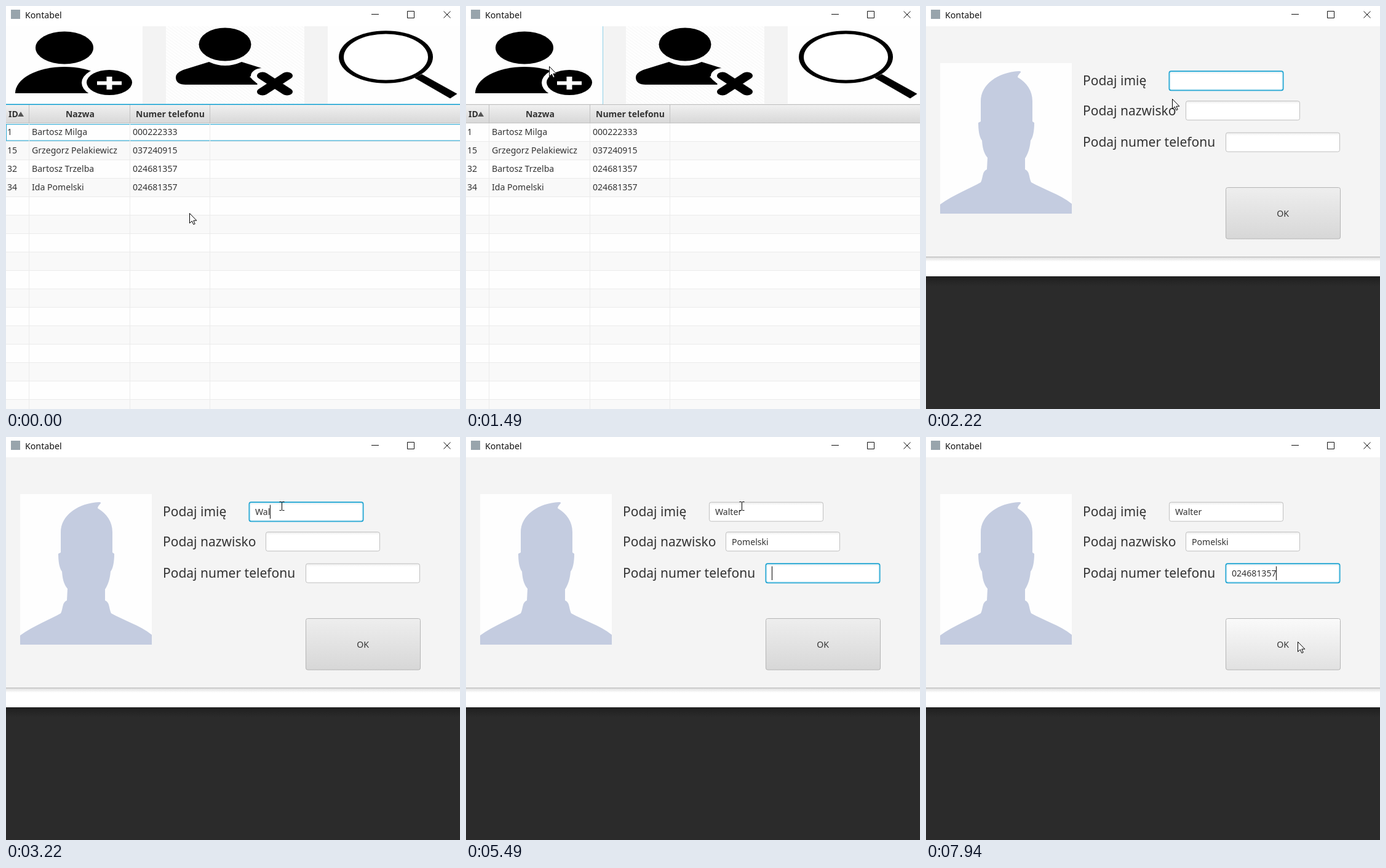
An HTML page that plays this animation: 738x656 px, repeating every 8 s.

```html
<!DOCTYPE html>
<html lang="pl">
<head>
<meta charset="utf-8">
<title>Kontabel</title>
<style>
  html, body { margin: 0; width: 100%; height: 100%; overflow: hidden; background: #fff; }
  svg { display: block; width: 100vw; height: 100vh; }
  text { font: 14.1px "Noto Sans", "Open Sans", sans-serif; fill: #333; white-space: pre; }
  .head { font-weight: 700; font-size: 14px; }
  .label { font-size: 21px; }
  .title { font-size: 14.2px; fill: #111; }
  .mid { text-anchor: middle; }
</style>
</head>
<body>
<svg id="stage" viewBox="0 0 738 656" xmlns="http://www.w3.org/2000/svg">
  <defs>
    <linearGradient id="headFill" x2="0" y2="1"><stop stop-color="#f0f0f0"/><stop offset="1" stop-color="#d8d8d8"/></linearGradient>
    <linearGradient id="buttonFill" x2="0" y2="1"><stop stop-color="#eee"/><stop offset="1" stop-color="#d7d7d7"/></linearGradient>
    <linearGradient id="hoverFill" x2="0" y2="1"><stop stop-color="#fafafa"/><stop offset="1" stop-color="#e1e1e1"/></linearGradient>
    <linearGradient id="fieldFill" x2="0" y2="1"><stop stop-color="#ececec"/><stop offset=".16" stop-color="#fff"/></linearGradient>
    <linearGradient id="softFill" x2="0" y2="1"><stop stop-color="#dedede"/><stop offset="1" stop-color="#fff"/></linearGradient>
    <linearGradient id="darkFill" x2="0" y2="1"><stop stop-color="#1f1f1f"/><stop offset="1" stop-color="#2b2b2b"/></linearGradient>
    <pattern id="hatch" width="7" height="5" patternUnits="userSpaceOnUse">
      <path d="M-1,-.7L8,5.7" stroke="#f6f6f6"/>
    </pattern>
  </defs>

  <rect width="738" height="656" fill="#fff"/>

  <g id="listView">
    <rect y="33" width="738" height="127" fill="#f3f3f3"/>
    <rect y="33" width="222" height="126" fill="#fefefe"/>
    <rect x="260" y="33" width="225" height="126" fill="#fefefe"/>
    <rect x="260" y="33" width="225" height="126" fill="url(#hatch)"/>
    <rect x="523" y="33" width="215" height="126" fill="#fefefe"/>

    <ellipse cx="95" cy="68" rx="47" ry="26.500"/>
    <path d="M15,142A80,43 0 0 1 175,142Z"/>
    <ellipse cx="168" cy="125" rx="45" ry="26" fill="#fefefe"/>
    <ellipse cx="168" cy="124.500" rx="37" ry="20.500"/>
    <path d="M148,125.500H188" stroke="#fefefe" stroke-width="6"/>
    <path d="M168,115V136" stroke="#fefefe" stroke-width="9"/>

    <ellipse cx="356" cy="62.500" rx="42.500" ry="27"/>
    <path d="M330,91Q356,103 383,91L428,105L396,115L410,128H292Q276,128 276,116Q276,109 288,104Z"/>
    <g transform="translate(437 126.500) scale(1.530 1)" stroke-linecap="round">
      <path d="M-13,-13L13,13M13,-13L-13,13" stroke="#fdfdfd" stroke-width="25"/>
      <path d="M-13,-13L13,13M13,-13L-13,13" stroke="#000" stroke-width="12"/>
    </g>

    <path d="M664,117L676,111L733.500,143L722,150.500Z"/>
    <ellipse cx="617.500" cy="83" rx="76.500" ry="42.700"/>
    <ellipse cx="617.500" cy="83" rx="68.500" ry="37.500" fill="#fff"/>

    <g id="rows"></g>
    <rect y="161" width="738" height="29" fill="url(#headFill)"/>
    <path d="M0,190.500H738M37.500,161V190M201.500,161V190M331.500,161V190" stroke="#c2c2c2"/>
    <path d="M37.500,191V656M201.500,191V656M331.500,191V656" stroke="#ebebeb"/>
    <text class="head" x="4" y="181">ID</text>
    <path d="M19,180H29L24,172Z" fill="#555"/>
    <text class="head mid" x="120.500" y="181">Nazwa</text>
    <text class="head mid" x="267" y="181">Numer telefonu</text>
    <path d="M0,160.500H738" stroke="#bdbdbd"/>
    <g id="tableFocus" fill="none">
      <path d="M0,160.200H738" stroke="#0d9fd2" stroke-width="1.600"/>
      <path d="M.5,192.700V219.200M0,192.700H37M38,192.700H201M202,192.700H331M332,192.700H738M0,219.200H37M38,219.200H201M202,219.200H331M332,219.200H738" stroke="#3fb0d6" stroke-width="1.300"/>
    </g>
    <path id="buttonFocus" d="M222.500,33V160" stroke="#8fd0e8"/>
  </g>

  <g id="formView">
    <rect y="33" width="738" height="375" fill="#f4f4f4"/>
    <rect y="409" width="738" height="7" fill="url(#softFill)"/>
    <path d="M0,408.500H738" stroke="#b4b4b4"/>
    <rect y="440" width="738" height="216" fill="#2b2b2b"/>
    <rect y="440" width="738" height="16" fill="url(#darkFill)"/>
    <rect x="23" y="93" width="214" height="245" fill="#fefefe"/>
    <path fill="#c4cce0" d="M23,338V323C45,307 72,297 89,287C93,279 91,269 99,266L100,247C93,238 92,230 91,219C86,212 85,200 85,190L89,188V155C89,128 116,108 151,106Q156,106 153,109Q149,113 149,116C164,125 173,138 173,155V188L176,190C176,203 174,214 170,219C169,231 166,240 161,248V266C169,269 167,279 171,287C190,298 217,306 237,322V338Z"/>
    <text class="label" x="255" y="129">Podaj imię</text>
    <text class="label" x="255" y="178">Podaj nazwisko</text>
    <text class="label" x="255" y="229">Podaj numer telefonu</text>
    <g id="fields"></g>
    <rect id="okButton" x="487.500" y="295.500" width="186" height="83.500" rx="3" stroke="#b5b5b5"/>
    <text class="mid" x="580" y="343">OK</text>
    <path id="caret" d="M.5,-11.500V11" stroke="#333" stroke-width="1.300"/>
  </g>

  <rect x="8" y="6" width="15" height="15" fill="#98a4ac"/>
  <text class="title" x="31" y="20">Kontabel</text>
  <path d="M594,13.500H606M652.500,8.500H663.500V19.500H652.500ZM711.500,8.500L722.500,19.500M722.500,8.500L711.500,19.500" fill="none" stroke="#111"/>

  <g id="pointer">
    <path id="arrow" d="M.5,.5V16.500L4.300,13L6.800,18.600L9.200,17.600L6.800,12.200H11.800Z" fill="#fff" stroke="#000"/>
    <path id="beam" d="M-3.500,-6.500H-.5L.5,-5.500L1.500,-6.500H4.500M.5,-6V7M-3.500,7.500H-.5L.5,6.500L1.500,7.500H4.500" fill="none" stroke="#000"/>
  </g>
</svg>
<script>
const LOOP = 8000, FORM_AT = 1520, FOCUS_AT = 1410;
const $ = id => document.getElementById(id);

function add(parent, tag, attrs, text = "") {
  const node = document.createElementNS("http://www.w3.org/2000/svg", tag);
  for (const key in attrs) node.setAttribute(key, attrs[key]);
  node.textContent = text;
  return parent.appendChild(node);
}
const show = (node, on) => node.setAttribute("visibility", on ? "inherit" : "hidden");

const contacts = [
  ["1", "Bartosz Milga", "000222333"],
  ["15", "Grzegorz Pelakiewicz", "037240915"],
  ["32", "Bartosz Trzelba", "024681357"],
  ["34", "Ida Pomelski", "024681357"]
];
for (let i = 0; i < 16; i++) {
  const y = 190 + 30 * i;
  add($("rows"), "rect", { y, width: 738, height: 30, fill: i % 2 ? "#f9f9f9" : "#fefefe" });
  add($("rows"), "path", { d: `M0,${y + .5}H738`, stroke: "#ebebeb" });
  (contacts[i] || []).forEach((text, col) =>
    add($("rows"), "text", { x: [2, 42, 206][col], y: y + 20 }, text));
}

// Each time is the moment one more character appears.
const fields = [
  { x: 395, y: 106, from: FORM_AT, to: 4270, value: "Walter",
    times: [2870, 3070, 3220, 3780, 3860, 4120] },
  { x: 422, y: 154.5, from: 4270, to: 5490, value: "Pomelski",
    times: [4580, 4700, 4820, 4930, 5050, 5160, 5270, 5380] },
  { x: 487, y: 206, from: 5490, to: LOOP, value: "024681357",
    times: [5920, 6050, 6260, 6540, 6750, 6920, 7200, 7400, 7910] }
];
for (const f of fields) {
  f.box = add($("fields"), "rect", { x: f.x + .5, y: f.y + .2, width: 185, height: 31, rx: 3, fill: "url(#fieldFill)" });
  f.glow = add($("fields"), "rect", { x: f.x + 2, y: f.y + 1.7, width: 182, height: 28, rx: 2, fill: "none", stroke: "#d9f0f8", "stroke-width": 1.5 });
  f.text = add($("fields"), "text", { x: f.x + 10, y: f.y + 21 });
}
const caretOff = [[2020, 2440], [3710, 3780]];

// time, x, y
const path = [
  [0, 298, 337], [600, 298, 337], [680, 282, 313], [800, 215, 215], [900, 150, 119], [970, 135, 98],
  [1780, 135, 98], [1880, 165, 104], [2000, 230, 130], [2140, 345, 158], [2250, 420, 148],
  [2340, 455, 124], [2440, 448, 112],
  [6920, 448, 112], [6960, 490, 153], [7030, 617, 272], [7079, 617, 272], [7120, 665, 306],
  [7190, 690, 325], [7300, 672, 338], [7450, 632, 336], [7600, 611, 333],
  [7879, 611, 333], [7940, 604, 333], [LOOP, 604, 333]
];
function pointerAt(t) {
  const i = path.findIndex(p => p[0] > t);
  const [t0, x0, y0] = path[i - 1], [t1, x1, y1] = path[i];
  const k = (t - t0) / (t1 - t0);
  return [Math.round(x0 + (x1 - x0) * k), Math.round(y0 + (y1 - y0) * k)];
}
const inside = (x, y, left, top, w, h) => x >= left && x <= left + w && y >= top && y <= top + h;

function render(t) {
  const form = t >= FORM_AT;
  show($("listView"), !form);
  show($("formView"), form);
  show($("tableFocus"), t < FOCUS_AT);
  show($("buttonFocus"), t >= FOCUS_AT);

  for (const f of fields) {
    const focused = t >= f.from && t < f.to;
    f.text.textContent = f.value.slice(0, f.times.filter(at => at <= t).length);
    f.box.setAttribute("stroke", focused ? "#20a5d2" : "#bfbfbf");
    f.box.setAttribute("stroke-width", focused ? 2 : 1);
    show(f.glow, focused);
    if (focused) {
      const end = f.text.textContent ? f.text.getComputedTextLength() : 0;
      $("caret").setAttribute("transform", `translate(${Math.round(f.x + 9.5 + end)} ${f.y + 16})`);
    }
  }
  show($("caret"), !caretOff.some(([a, b]) => t >= a && t < b));

  // The groups inherit visibility, so hidden views keep their children hidden.
  if (!form) for (const node of [$("caret"), ...fields.map(f => f.glow)]) show(node, false);
  if (form) for (const id of ["tableFocus", "buttonFocus"]) show($(id), false);

  const [x, y] = pointerAt(t);
  const overField = form && fields.some(f => inside(x, y, f.x, f.y, 186, 31));
  $("pointer").setAttribute("transform", `translate(${x} ${y})`);
  show($("arrow"), !overField);
  show($("beam"), overField);
  $("okButton").setAttribute("fill", inside(x, y, 487, 295, 187, 84) ? "url(#hoverFill)" : "url(#buttonFill)");
}

const start = performance.now();
function tick() {
  render((performance.now() - start) % LOOP);
  requestAnimationFrame(tick);
}
tick();
</script>
</body>
</html>
```
